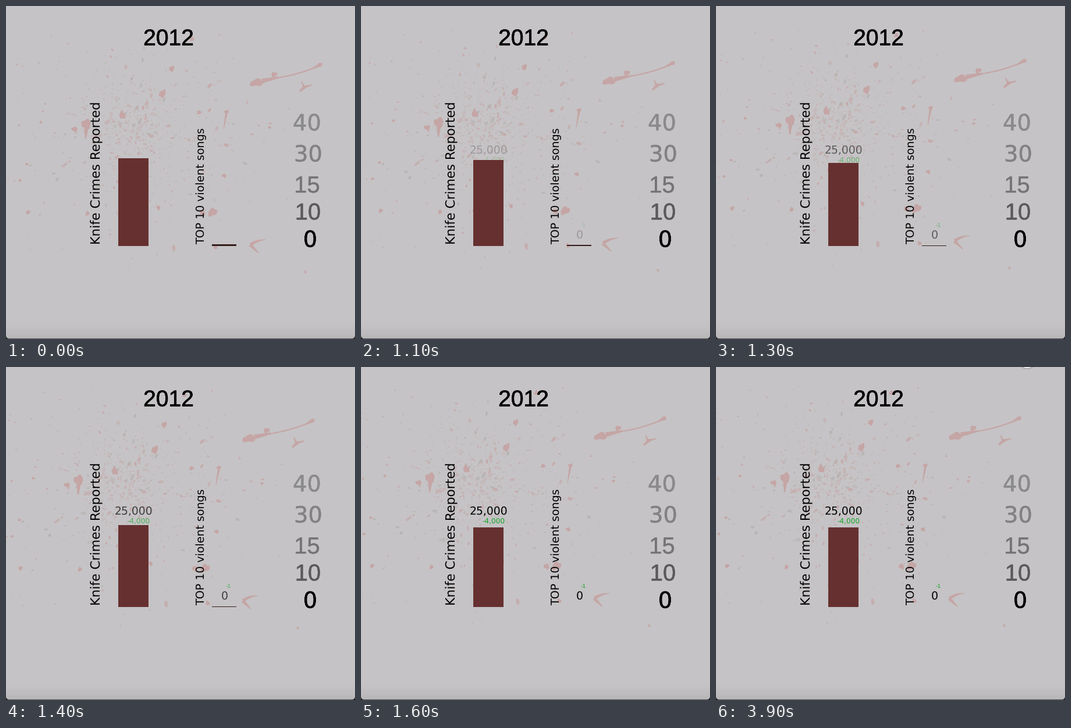
These frames come from a looping animation (600x573 px, 4.1 s). A matplotlib script:

```python
import numpy as np
import matplotlib.pyplot as plt
from matplotlib import patheffects
from matplotlib.animation import FuncAnimation
from matplotlib.collections import PatchCollection
from matplotlib.patches import Circle, Ellipse, Polygon, Rectangle
from matplotlib.transforms import Affine2D

W, H, DPI = 600, 573, 100
FRAMES, INTERVAL = 41, 100
PAPER = np.array([197, 195, 197]) / 255
BLACK = np.zeros(3)
GREEN = np.array([22, 165, 38]) / 255
STAIN = np.array([197, 163, 163]) / 255
DUST = np.array([176, 174, 170]) / 255
WIDE, PLAIN = "DejaVu Sans", "Liberation Sans"
BASE = 413

plt.rcParams["text.hinting"] = "none"
fig = plt.figure(figsize=(W / DPI, H / DPI), dpi=DPI, facecolor=PAPER)
ax = fig.add_axes([0, 0, 1, 1])
ax.axis("off")
rng = np.random.default_rng(12)


def mix(color, amount):
    return PAPER + (np.asarray(color) - PAPER) * amount


def label(x, y, text, px, font=WIDE, color=BLACK, weight=0.0, **kw):
    kw = {"ha": "center", "va": "baseline", "zorder": 3, **kw}
    t = ax.text(x, y, text, fontsize=px * 72 / DPI, family=font, color=color, **kw)
    if weight:
        t.set_path_effects([patheffects.withStroke(linewidth=weight, foreground=color)])
    return t


def outward(x, y):
    """Direction of flight from the middle of the splash."""
    return np.arctan2(y - 225, x - 215)


def blob(x, y, r, stretch=1.3, angle=None):
    """Uneven drop, longer along its angle."""
    angle = outward(x, y) if angle is None else angle
    a = np.linspace(0, 2 * np.pi, 40)
    p, q = rng.uniform(0, 6, 2)
    edge = r * (1 + 0.14 * np.sin(3 * a + p) + 0.09 * np.sin(5 * a + q))
    c, s = np.cos(angle), np.sin(angle)
    u, v = stretch * edge * np.cos(a), edge * np.sin(a)
    return Polygon(np.c_[x + c * u - s * v, y + s * u + c * v])


def smear(start, end, r0, r1, bend=0.0):
    """Tapering streak, bowed sideways by bend pixels."""
    n = np.linspace(0, 1, 40)[:, None]
    start, end = np.array(start), np.array(end)
    along = end - start
    side = np.array([-along[1], along[0]]) / np.hypot(*along)
    mid = start + along * n + side * bend * np.sin(np.pi * n)
    half = side * (r0 + (r1 - r0) * n)
    return Polygon(np.r_[mid + half, (mid - half)[::-1]])


def specks(count, center, spread, size):
    patches, colors = [], []
    for x, y in rng.normal(center, spread, (count, 2)):
        if not (3 < x < 540 and 42 < y < 460):
            continue
        r = 0.7 + min(rng.exponential(size), 3.2)
        angle = np.degrees(outward(x, y)) + rng.normal(0, 25)
        patches.append(Ellipse((x, y), 2 * r * rng.uniform(1, 1.7), 1.5 * r, angle=angle))
        tone = STAIN if rng.random() < 0.8 else DUST
        colors.append(mix(tone, rng.uniform(0.25, 0.8)))
    return patches, colors


def splash():
    cloud = specks(430, (212, 212), (48, 42), 0.55)
    spray = specks(330, (215, 225), (115, 95), 0.6)
    strays = specks(45, (330, 250), (110, 110), 0.8)
    drops = [(118, 212, 4), (200, 188, 5), (285, 108, 4), (332, 183, 3),
             (379, 182, 3), (338, 356, 4), (375, 292, 3), (38, 355, 3),
             (36, 272, 2), (24, 300, 2), (60, 200, 2), (453, 209, 2),
             (320, 57, 3), (140, 357, 3), (262, 347, 3), (360, 415, 3)]
    shapes = [blob(*d) for d in drops]
    shapes += [
        blob(138, 203, 8, 1), smear((138, 208), (137, 228), 4, 1),
        blob(269, 151, 5, 1.4, 2.1), blob(355, 355, 6, 1.4, -0.5),
        # long streak at the right
        blob(431, 132, 6, 1.9, -0.15), smear((440, 129), (468, 123), 4, 1.5),
        blob(461, 118, 4), smear((465, 124), (534, 105), 1, 1.2, 2),
        blob(538, 102, 3, 2.3, -0.45),
        # small tails
        smear((379, 184), (374, 212), 2, 0.4),
        smear((505, 147), (515, 138), 1.5, 3), smear((514, 139), (526, 136), 2, 0.8),
        smear((508, 130), (513, 141), 0.7, 2),
        smear((446, 402), (420, 411), 0.5, 3, 2), smear((420, 411), (434, 425), 3, 0.7),
    ]
    patches = cloud[0] + spray[0] + strays[0] + shapes
    colors = cloud[1] + spray[1] + strays[1] + [mix(STAIN, 0.95)] * len(shapes)
    return PatchCollection(patches, facecolors=colors, edgecolors="none", zorder=1)


# Page edge
fade = np.linspace(0, 1, 30)[:, None, None] ** 1.5
ax.imshow(PAPER * (1 - 0.07 * fade), extent=(0, W, H, H - 30), aspect="auto", zorder=0)
ax.set(xlim=(0, W), ylim=(H, 0))
ax.add_patch(Rectangle((0, H - 1), W, 1, fc="#4c4b4c", zorder=5))
for x, side in ((0, 1), (W, -1)):
    ax.add_patch(Polygon([(x, H - 5), (x + side * 1.5, H - 2), (x + side * 5, H), (x, H)],
                         fc="#1c1c1c", zorder=5))

stains = ax.add_collection(splash())

# Fixed text
label(279.5, 67.5, "2012", 39, PLAIN, weight=0.5)
for x, y, text, px, font, shade in (
        (517.5, 214, "40", 38.5, WIDE, "#8a898b"), (519.5, 267.5, "30", 38.5, WIDE, "#828183"),
        (517.5, 321, "15", 40, PLAIN, "#757476"), (519, 367.5, "10", 40, PLAIN, "#5a595c"),
        (523, 414.5, "0", 38.5, WIDE, "#000000")):
    label(x, y, text, px, font, shade, weight=0.3)
for x, text, px in ((162, "Knife Crimes Reported", 21.9), (341.5, "TOP 10 violent songs", 19)):
    label(x, 410.5, text, px, rotation=90, rotation_mode="anchor", ha="left")

# Bars hide the counters that appear behind them
crimes = ax.add_patch(Rectangle((193, 262), 52, 151, fc="#663030", zorder=4))
songs = ax.add_patch(Rectangle((354, 410), 42, 3, fc="#341c1c", zorder=4))
counters = [
    (label(219.5, 253.5, "25,000", 18.8), BLACK),
    (label(375.5, 400, "0", 19), BLACK),
    (label(227.5, 269.5, "-4,000", 12.1), GREEN),
    (label(382.3, 380.3, "-1", 10.5, PLAIN), GREEN),
]

# Round button peeking in from the top edge
button = [ax.add_patch(Circle((531, -20), r, fc=c, ec="none", zorder=6))
          for r, c in ((16, "#b5b3b5"), (15, "#9d9b9d"), (14, "#f0eff0"))]


def animate(i):
    s = float(np.clip((i - 9.6) / 6.4, 0, 1))
    stains.set_transform(Affine2D().translate(-19 * s, -12.7 * s) + ax.transData)

    top = 262 + 14.4 * s
    crimes.set(y=top, height=BASE - top)
    thickness = 2.6 - 2.2 * s
    songs.set(y=BASE - thickness, height=thickness)
    for text, color in counters:
        text.set_color(mix(color, s))
        text.set_visible(s > 0)

    low = np.interp(i, (22, 23, 25, 27, 37, 39), (-4, -0.5, 1.3, 1.6, 1.6, 2.2))
    x = np.interp(i, (37, 39), (531, 535))
    for disc in button:
        disc.center = (x, low - 14)
        disc.set_visible(i > 22)
    return [stains, crimes, songs, *button, *(t for t, _ in counters)]


anim = FuncAnimation(fig, animate, frames=FRAMES, interval=INTERVAL,
                     repeat=True, repeat_delay=0, blit=False)
plt.show()
```
